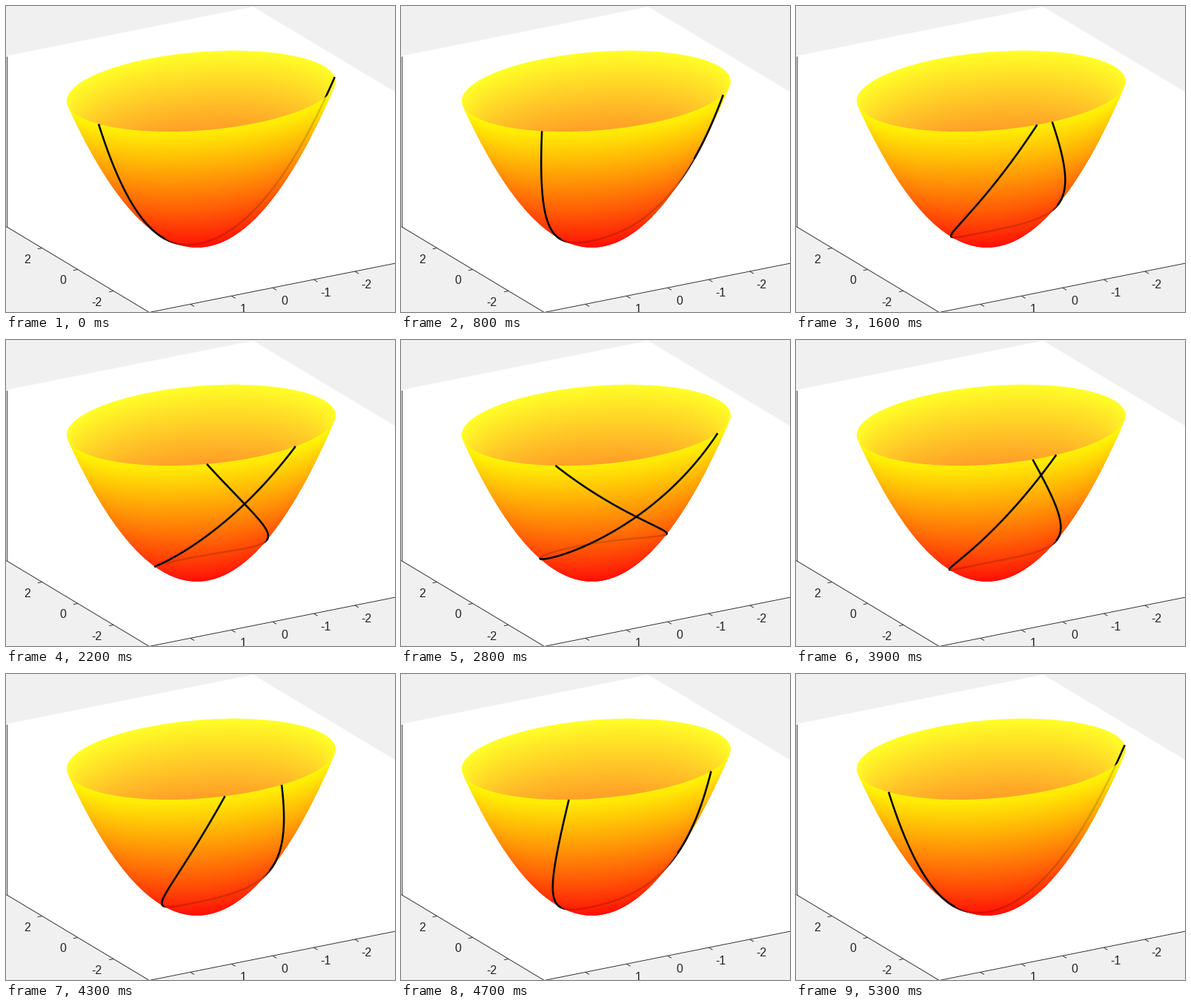
Recreate the animation shown at these times as a matplotlib script. Size 525 px wide and 414 px high, loop 5400 ms.

```python
import numpy as np
import matplotlib.pyplot as plt
from matplotlib.animation import FuncAnimation

W, H, DPI = 525, 414, 64
PT = 72 / DPI                       # points per pixel
R = 3.0                             # rim radius of z = x^2 + y^2
ALPHA = 0.85
INK = "#262626"

# Screen vectors of one unit along each data axis
EX = np.array([-55.5, 11.1])
EY = np.array([-24.1, -14.5])
EZ = np.array([0.0, -23.1])
ORIGIN = np.array([262.9, 322.7])
VIEW = np.array([24.1, -55.5, 46.4]) / 55.5     # towards the viewer


def project(x, y, z):
    x, y, z = (np.asarray(a, float)[..., None] for a in (x, y, z))
    return ORIGIN + x * EX + y * EY + z * EZ


def wall_layers(ss=3):
    """Far and near wall of the bowl as RGBA images, by ray casting."""
    px = (np.arange(W * ss) + 0.5) / ss - 0.5
    py = (np.arange(H * ss) + 0.5) / ss - 0.5
    u, v = np.meshgrid(px - ORIGIN[0], py - ORIGIN[1])
    det = EX[0] * EY[1] - EY[0] * EX[1]
    x0 = (u * EY[1] - v * EY[0]) / det
    y0 = (EX[0] * v - EX[1] * u) / det
    dx, dy, dz = VIEW
    a = dx * dx + dy * dy
    b = 2 * (x0 * dx + y0 * dy) - dz
    c = x0 ** 2 + y0 ** 2
    disc = b * b - 4 * a * c
    root = np.sqrt(np.maximum(disc, 0))
    layers = []
    for sign in (-1, 1):
        z = (-b + sign * root) / (2 * a) * dz
        hit = ((disc >= 0) & (z <= R * R)).astype(float)
        green = np.clip(z / R ** 2, 0, 1) * hit
        cover, green = (m.reshape(H, ss, W, ss).mean(axis=(1, 3))
                        for m in (hit, green))
        rgba = np.zeros((H, W, 4))
        rgba[..., 0] = 1
        rgba[..., 1] = green / np.maximum(cover, 1e-9)
        rgba[..., 3] = ALPHA * cover
        layers.append(np.clip(rgba, 0, 1))
    return layers


def geodesic(p, n=900):
    """Geodesic whose closest distance to the axis is p."""
    s = np.linspace(-1, 1, n) * np.sqrt(R * R - p * p)
    r = np.sqrt(s * s + p * p)
    turn = (2 * p * np.arcsinh(2 * s / np.sqrt(1 + 4 * p * p))
            + np.arctan(s / (p * np.sqrt(1 + 4 * r * r))))
    x, y = -r * np.sin(turn), r * np.cos(turn)
    pts = project(x, y, r * r)
    facing = 2 * (x * VIEW[0] + y * VIEW[1]) - VIEW[2] > 0
    return pts, np.where(facing[:, None], pts, np.nan)


fig = plt.figure(figsize=(W / DPI, H / DPI), dpi=DPI, facecolor="#f0f0f0")
ax = fig.add_axes([0, 0, 1, 1])
ax.axis("off")


def segment(a, b):
    ax.plot(*zip(a, b), color=INK, lw=0.9 * PT, zorder=1,
            solid_capstyle="butt")


def label(x, y, text, ha):
    ax.text(x, y, text, ha=ha, va="center_baseline", color=INK,
            family="Liberation Sans", fontsize=16 * PT, zorder=1)


# Box walls and floor
box = project([3, 3, -3, -3, -3, 3], [4, 4, 4, -4, -4, -4],
              [0, 10, 10, 10, 0, 0])
ax.fill(*box.T, color="white", lw=0, zorder=0)
left, top, front, right = box[0], box[1], box[5], box[4]
segment((0, left[1]), (0, top[1]))
segment(left, front)
segment(front, right)

for k in range(-2, 3):
    tick = project(k, -4, 0)
    segment(tick, tick + (5.2, 3.1))
    if k < 2:
        label(tick[0] + 16, tick[1] + 17, str(k), "center")
for k in (-2, 0, 2):
    tick = project(3, k, 0)
    segment(tick, tick + (-6, 1.2))
    label(tick[0] - 15.5, tick[1] + 14, str(k), "right")

far, near = wall_layers()
ax.imshow(far, zorder=2, interpolation="nearest", aspect="auto")
ax.imshow(near, zorder=4, interpolation="nearest", aspect="auto")
style = dict(color="black", lw=2.5 * PT, solid_capstyle="butt",
             solid_joinstyle="round")
back_line, = ax.plot([], [], zorder=3, **style)
front_line, = ax.plot([], [], zorder=5, **style)
ax.set_xlim(-0.5, W - 0.5)
ax.set_ylim(H - 0.5, -0.5)


def update(frame):
    i = max(0, frame - 4)                   # the first pose is held
    step = i if i < 24 else 49 - i          # up to 23, then 25 back to 0
    whole, facing = geodesic(0.1 + 0.04 * step)
    back_line.set_data(*whole.T)
    front_line.set_data(*facing.T)
    return back_line, front_line


anim = FuncAnimation(fig, update, frames=54, interval=100, repeat=True,
                     repeat_delay=0, init_func=lambda: update(0))
plt.show()
```
